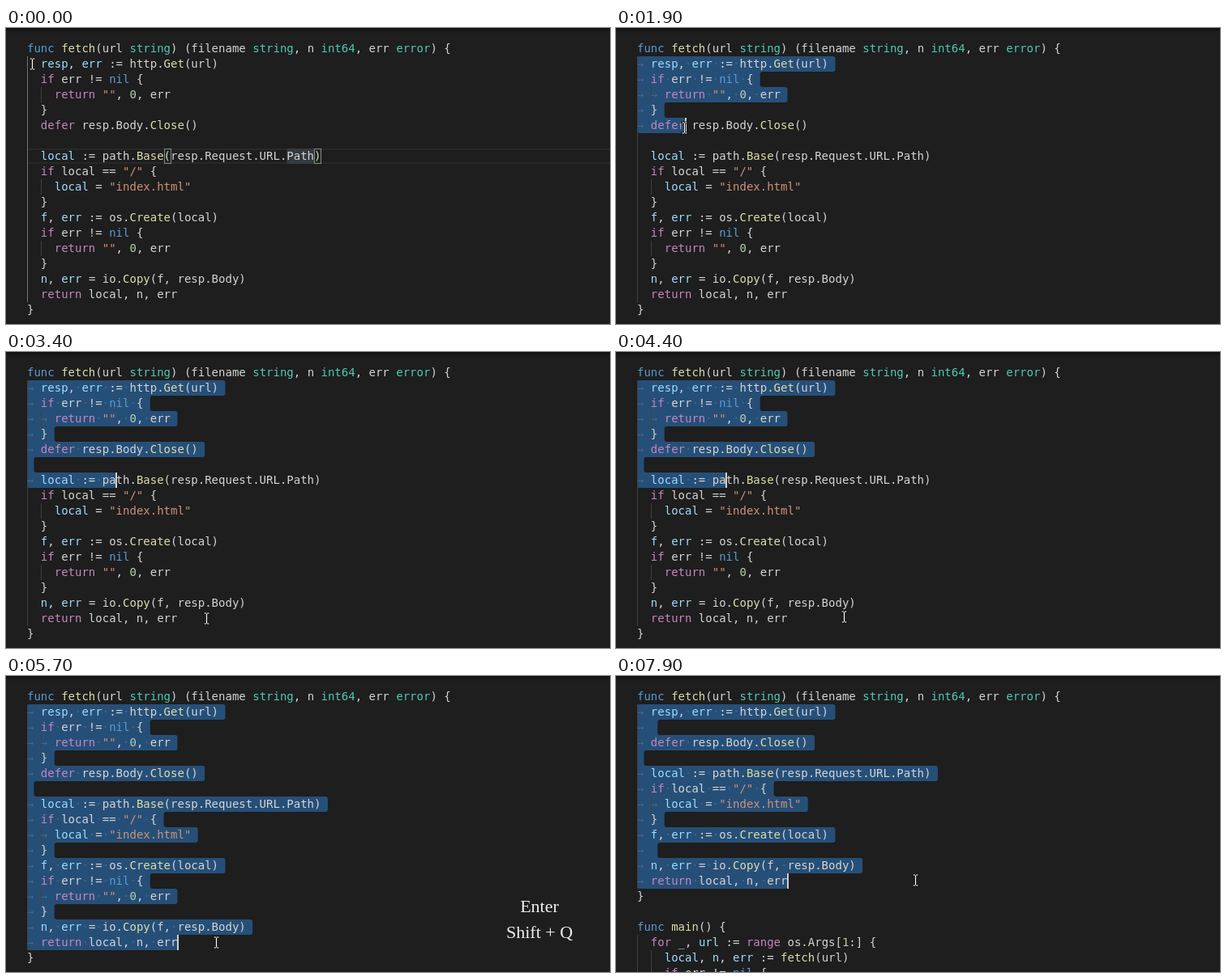
An HTML page that plays this animation: 745 by 366 pixels, repeating every 8 s.

```html
<!DOCTYPE html>
<html lang="en">
<head>
<meta charset="utf-8">
<title>Code selection</title>
<style>
  html, body { margin: 0; width: 100%; height: 100%; overflow: hidden; background: #1e1e1e; }
  #stage { position: relative; width: 745px; height: 366px; overflow: hidden; background: #1e1e1e; }
  #stage > * { position: absolute; }
  svg { left: 0; top: 0; }
  pre {
    left: 26px; top: 16px; margin: 0;
    font: 14px/19px "DejaVu Sans Mono", monospace;
    font-variant-ligatures: none; color: #d4d4d4;
  }
  #marks { color: rgba(227, 228, 226, .16); }
  .decl { color: #569cd6; }
  .flow { color: #c586c0; }
  .type { color: #4ec9b0; }
  .str { color: #ce9178; }
  .num { color: #b5cea8; }
  .fn { color: #dcdcaa; }
  .var { color: #9cdcfe; }
  #shadow { left: 0; top: 0; width: 745px; height: 6px; box-shadow: #000 0 6px 6px -6px inset; }
  #keys {
    left: 558px; top: 269px; width: 200px; text-align: center;
    font: 22px/32px "Liberation Serif", serif; color: #eee;
  }
</style>
</head>
<body>
<div id="stage">
  <svg id="under" width="745" height="366"></svg>
  <pre id="marks"></pre>
  <pre id="code"></pre>
  <svg id="over" width="745" height="366">
    <rect id="caret" width="2" height="19" fill="#d0d0ce" shape-rendering="crispEdges"/>
    <g id="mouse" fill="none">
      <path d="M-3 -6.5H3M-3 6.5H3M0 -6.5V6.5" stroke="#111" stroke-width="3" stroke-linecap="square"/>
      <path d="M-3 -6.5H-.5M.5 -6.5H3M-3 6.5H-.5M.5 6.5H3M0 -6V6" stroke="#fff" stroke-width="1.2"/>
    </g>
  </svg>
  <div id="keys">Enter<br>Shift + Q</div>
  <div id="shadow"></div>
</div>
<script>
const LOOP = 8000, X0 = 26, Y0 = 16, CW = 14 * 0.60205, LH = 19;
const $ = id => document.getElementById(id);

const check = `	if err != nil {
		return "", 0, err
	}`;
const body = guard => `func fetch(url string) (filename string, n int64, err error) {
	resp, err := http.Get(url)
${guard}
	defer resp.Body.Close()

	local := path.Base(resp.Request.URL.Path)
	if local == "/" {
		local = "index.html"
	}
	f, err := os.Create(local)
${guard}
	n, err = io.Copy(f, resp.Body)
	return local, n, err
}`;
const before = body(check).split("\n");
const after = (body("\t") + `

func main() {
	for _, url := range os.Args[1:] {
		local, n, err := fetch(url)
		if err != nil {`).split("\n");

// Pointer positions: time, x, y
const pointer = [
  [0, 32, 44], [1200, 29, 45], [1300, 34, 56], [1400, 42, 72], [1500, 52, 88], [1600, 62, 102],
  [1900, 84, 123], [2000, 92, 131], [2100, 102, 139], [2200, 114, 148], [2300, 127, 157], [2400, 136, 165],
  [2500, 141, 173], [2600, 151, 189], [2800, 180, 239], [2900, 205, 279], [3000, 225, 305], [3100, 238, 320],
  [3300, 245, 327], [3400, 247, 329], [4100, 264, 328], [4300, 275, 328], [4400, 281, 327],
  [4900, 275, 328], [5000, 263, 329], [5100, 259, 329], [7900, 369, 252]
];

const tabs = s => s.match(/^\t*/)[0].length;
const expand = s => s.replace(/\t/g, "  ");
const colX = c => X0 + c * CW;
const rowY = r => Y0 + r * LH;

const token = /("[^"]*")|\b(func|nil)\b|\b(if|return|defer|for|range)\b|\b(string|int64|error)\b|\b(\d+)\b|(\w+)(?=\()|(\w+)(?=(?:, \w+)* :?= )|\w+/g;
const kinds = ["str", "decl", "flow", "type", "num", "fn", "var"];
const paint = s => expand(s).replace(token, (m, ...groups) => {
  const i = groups.slice(0, kinds.length).findIndex(g => g !== undefined);
  return i < 0 ? m : `<span class="${kinds[i]}">${m}</span>`;
});

const rect = (x, y, w, h, fill, extra = "") =>
  `<rect x="${x}" y="${y}" width="${w}" height="${h}" fill="${fill}" ${extra}/>`;

function hit(lines, x, y) {
  const row = Math.floor((y - Y0) / LH), line = lines[row], indent = tabs(line) * 2;
  let col = Math.round((x - X0) / CW);
  if (col < indent) col = Math.round(col / 2) * 2;
  return [row, Math.min(col, expand(line).length)];
}

function roundedPath(points, r) {
  const toward = (a, b) => {
    const dx = b[0] - a[0], dy = b[1] - a[1], d = Math.hypot(dx, dy), k = Math.min(r, d / 2) / d;
    return `${a[0] + dx * k} ${a[1] + dy * k}`;
  };
  const n = points.length;
  return points.map((p, i) =>
    `${i ? "L" : "M"}${toward(p, points[(i + n - 1) % n])}Q${p[0]} ${p[1]} ${toward(p, points[(i + 1) % n])}`
  ).join("") + "Z";
}

function selection(lines, [row, col]) {
  const edges = [];
  for (let r = 1; r <= row; r++) {
    const x = colX(r < row ? expand(lines[r]).length + 1 : col);
    if (x > X0) edges.push([x, r]);
  }
  const points = [[X0, rowY(1)]];
  edges.forEach(([x, r], i) => {
    if (!i || edges[i - 1][0] !== x) points.push([x, rowY(r)]);
    if (i === edges.length - 1 || edges[i + 1][0] !== x) points.push([x, rowY(r + 1)]);
  });
  points.push([X0, rowY(edges[edges.length - 1][1] + 1)]);
  return `<path d="${roundedPath(points, 3)}" fill="#264f78"/>`;
}

function guides(lines, active) {
  return lines.map((s, r) => {
    const depth = s ? tabs(s) : Math.min(tabs(lines[r - 1]), tabs(lines[r + 1]));
    let out = "";
    for (let d = 0; d < depth; d++) {
      if (d && s.trim() && depth === d) break;
      out += rect(Math.round(colX(d * 2)), rowY(r), 1, LH, active && !d ? "#707070" : "#404040");
    }
    return out;
  }).join("");
}

const currentLine = r =>
  rect(X0, rowY(r), 745, 2, "#282828") + rect(X0, rowY(r + 1) - 2, 745, 2, "#282828");

function matches() {
  const bracket = c => rect(Math.round(colX(c)) + .5, rowY(7) + .5, 8, LH - 1, "rgba(0,100,0,.1)", 'stroke="#888"');
  return rect(colX(38), rowY(7), 4 * CW, LH, "#343a3e") + bracket(20) + bracket(42);
}

const whitespace = (lines, [row, col]) => lines.map((s, r) => {
  if (r < 1 || r > row) return "";
  const shown = s.replace(/[^\t ]/g, "\0").replace(/\t/g, "→ ").replace(/(?<!→) /g, "·").replace(/\0/g, " ");
  return r < row ? shown : shown.slice(0, col);
}).join("\n");

function headAt(t, lines, x, y) {
  if (t >= 7900) return [12, expand(lines[12]).length];
  if (t >= 5100) return [16, expand(lines[16]).length];
  return t >= 2400 ? [7, 13] : hit(lines, x, y);
}

function caretShown(t) {
  if (t < 1200) return false;
  return !(t >= 2800 && t < 3300 || t >= 3800 && t < 4300 || t >= 4900 && t < 5100);
}

function draw(t) {
  const lines = t < 7900 ? before : after;
  const [, x, y] = pointer.filter(p => p[0] <= t).pop();
  const idle = t < 1200;
  const head = idle ? [7, 42] : headAt(t, lines, x, y);
  const empty = idle || head[0] === 1 && head[1] === 0;

  $("under").innerHTML =
    (empty ? currentLine(head[0]) : selection(lines, head)) +
    `<g shape-rendering="crispEdges">${guides(lines, empty)}</g>` +
    (idle ? matches() : "");
  $("code").innerHTML = lines.map(paint).join("\n");
  $("marks").textContent = empty ? "" : whitespace(lines, head);
  $("caret").setAttribute("x", Math.floor(colX(head[1])));
  $("caret").setAttribute("y", rowY(head[0]));
  $("caret").style.display = caretShown(t) ? "" : "none";
  $("mouse").setAttribute("transform", `translate(${x + .5} ${y + .5})`);
  $("keys").style.display = t >= 5600 && t < 7300 ? "" : "none";
}

let last = -1;
function tick() {
  const step = Math.floor(performance.now() % LOOP / 100);
  if (step !== last) draw((last = step) * 100);
  requestAnimationFrame(tick);
}
tick();
</script>
</body>
</html>
```
